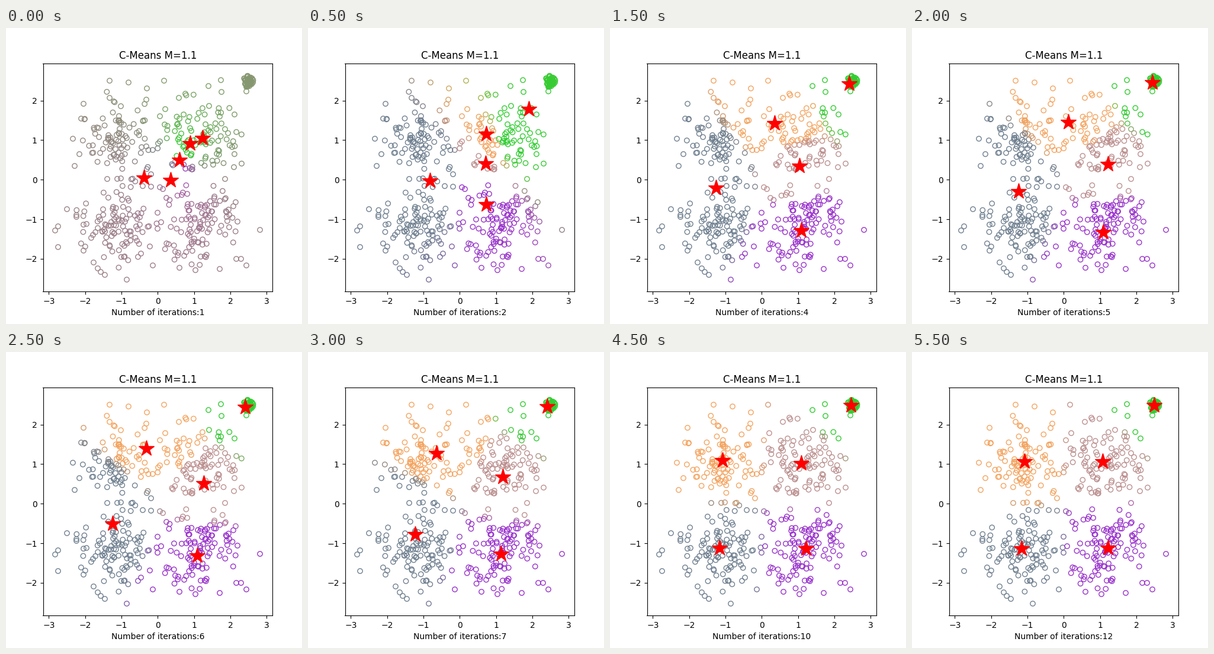
A matplotlib script that plays this animation: 500 px wide and 500 px high, repeating every 6000 ms.

```python
import numpy as np
import matplotlib.pyplot as plt
from matplotlib.animation import FuncAnimation
from matplotlib.colors import to_rgb

ITERATIONS = 12
FUZZINESS = 1.1
PALETTE = np.array([to_rgb(name) for name in
                    ("slategray", "sandybrown", "rosybrown", "darkorchid", "limegreen")])

# Cluster centres (x, y per colour) at key iterations; 0 is the initial guess.
KEY_ITERATIONS = [0, 1, 2, 3, 5, 6, 8, 10, 12]
KEY_CENTERS = np.array([
    [.40, .46, .47, .46, .48, .45, .50, .42, .53, .54],
    [-.38, .05, .89, .91, .59, .49, .36, -.01, 1.24, 1.05],
    [-.82, -.03, .73, 1.16, .71, .41, .72, -.62, 1.90, 1.78],
    [-1.26, -.12, .57, 1.39, .85, .31, 1.09, -1.25, 2.37, 2.38],
    [-1.25, -.30, .13, 1.45, 1.22, .39, 1.09, -1.33, 2.44, 2.46],
    [-1.25, -.51, -.32, 1.39, 1.26, .51, 1.09, -1.31, 2.41, 2.44],
    [-1.20, -1.03, -.98, 1.16, 1.12, .84, 1.18, -1.23, 2.41, 2.46],
    [-1.16, -1.12, -1.08, 1.09, 1.08, 1.02, 1.22, -1.13, 2.46, 2.49],
    [-1.16, -1.13, -1.09, 1.07, 1.07, 1.06, 1.22, -1.12, 2.48, 2.49],
])

# Stragglers around the clusters, in stage pixels.
STRAGGLERS = np.array([
    (175, 89), (207, 92), (267, 89), (238, 102), (237, 121), (131, 128),
    (113, 187), (124, 213), (116, 233), (103, 306), (119, 316), (119, 319),
    (88, 335), (83, 342), (88, 370), (131, 376), (160, 412), (167, 417),
    (204, 425), (248, 401), (293, 405), (320, 409), (361, 407), (389, 390),
    (397, 390), (406, 401), (429, 341), (391, 327), (384, 301), (398, 229),
    (382, 201), (386, 146), (363, 88), (364, 108), (342, 98), (303, 111),
    (292, 118), (260, 149), (269, 137), (268, 163), (289, 163), (257, 195),
    (245, 247), (260, 269), (265, 272), (231, 267), (245, 268), (370, 255),
    (385, 235), (406, 107), (182, 124), (175, 118), (127, 153), (136, 331),
    (148, 396), (155, 406), (243, 369), (228, 381), (256, 339), (262, 328),
    (256, 312), (271, 287), (171, 255), (194, 254),
])


def to_data(pixels):
    return (pixels - (256.4, 256.2)) / (61.35, -66.85)


def blob(rng, center, count, spread=.55, reach=1.2):
    offsets = rng.normal(0, spread, (count * 3, 2))
    near = offsets[np.hypot(*offsets.T) < reach]
    return center + near[:count]


def make_points():
    rng = np.random.default_rng(7)
    return np.vstack([
        blob(rng, (-1.05, 1.12), 90),
        blob(rng, (-1.12, -1.12), 100),
        blob(rng, (1.2, -1.12), 105),
        blob(rng, (1.12, 1.03), 95),
        blob(rng, (2.5, 2.48), 90, .06, .15),
        to_data(STRAGGLERS),
    ])


def centers_at(iteration):
    flat = [np.interp(iteration, KEY_ITERATIONS, column) for column in KEY_CENTERS.T]
    return np.reshape(flat, (5, 2))


def blended_colors(points, centers):
    distance = np.linalg.norm(points[:, None] - centers, axis=2) + 1e-9
    nearness = distance.min(axis=1, keepdims=True) / distance
    weight = nearness ** (2 / (FUZZINESS - 1))
    weight /= weight.sum(axis=1, keepdims=True)
    return np.clip(weight @ PALETTE, 0, 1)


points = make_points()
fig, ax = plt.subplots(figsize=(5, 5), dpi=100)
ax.set_title(f"C-Means M={FUZZINESS}")
ax.set_xlim(-3.16, 3.155)
ax.set_ylim(-2.824, 2.935)
label = ax.set_xlabel("")
circles = ax.scatter(*points.T, s=36, facecolors="none", edgecolors="gray", linewidths=1)
stars, = ax.plot([], [], "*", color="red", markersize=20)


def update(frame):
    iteration = frame + 1
    # Memberships come from the previous centres, the stars show the new ones.
    circles.set_edgecolor(blended_colors(points, centers_at(iteration - 1)))
    stars.set_data(*centers_at(iteration).T)
    label.set_text(f"Number of iterations:{iteration}")
    return circles, stars, label


anim = FuncAnimation(fig, update, frames=ITERATIONS, interval=500, repeat=True)
plt.show()
```
